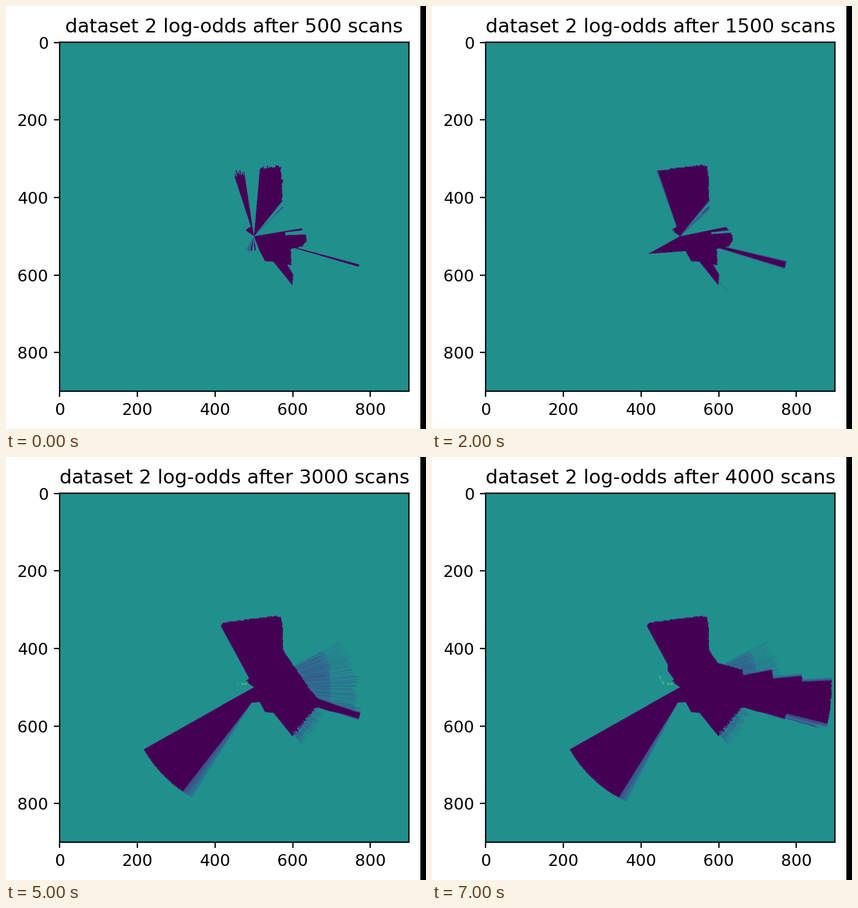
Write a matplotlib script that moves like this. It is 745x751 px and loops after 8000 ms.

```python
import numpy as np
import matplotlib.pyplot as plt
from matplotlib.animation import FuncAnimation
from matplotlib.patches import Rectangle

W, H, DPI = 745, 751, 64
PX = 72 / DPI                      # points per pixel
LEFT, RIGHT, TOP, BOTTOM = 95.1, 714.7, 64.3, 683.9
STAGES, CELLS, ROBOT = 8, 900, 500
UNKNOWN = 0.5
rng = np.random.default_rng(4)

# Polar view of the grid from the robot; angles in degrees, 0 right, 90 down
rows, cols = np.mgrid[:CELLS, :CELLS]
ANG = np.degrees(np.arctan2(rows - ROBOT, cols - ROBOT))
RAD = np.hypot(rows - ROBOT, cols - ROBOT)
maps = np.full((STAGES, CELLS, CELLS), UNKNOWN, dtype=np.float32)

# Corners of the room: angle, distance in cells
WALL = np.array([(-118, 183), (-115, 185), (-91, 178), (-73, 193), (-69, 196),
                 (-64, 171), (-52.6, 124), (-24, 119), (-9.5, 124), (-2, 135),
                 (5, 138), (12, 129), (19, 102), (38, 124), (40.5, 113),
                 (44, 142), (52, 163), (52.7, 84), (66, 71), (69, 41), (97, 39)])


def chord(a, a0, r0, a1, r1):
    """Distance to the straight line between two polar points."""
    def sin(d):
        return np.sin(np.radians(d))
    return sin(a1 - a0) / (sin(a1 - a) / r0 + sin(a - a0) / r1)


def wall(a):
    angles, reach = WALL.T
    a = np.clip(a, angles[0], angles[-1])
    k = np.clip(np.searchsorted(angles, a) - 1, 0, len(WALL) - 2)
    return chord(a, angles[k], reach[k], angles[k + 1], reach[k + 1])


def darken(stage, cells, value):
    maps[stage][cells] = np.minimum(maps[stage][cells], value)


def sweep(stage, a0, a1, r0=None, r1=None, shade=0.0, soft=0.0, ragged=0.02):
    """Clear a sector up to the wall, an arc (r0) or a line (r0 to r1)."""
    cells = (ANG >= a0 - soft) & (ANG <= a1 + soft)
    a = np.clip(ANG[cells], a0, a1)
    if r0 is None:
        reach = wall(a)
    elif r1 is None:
        reach = np.full_like(a, r0)
    else:
        reach = chord(a, a0, r0, a1, r1)
    noise = rng.random(int((a1 - a0) / 0.8) + 2)
    reach = reach * (1 - ragged * noise[((a - a0) / 0.8).astype(int)])
    fade = np.abs(ANG[cells] - a) / max(soft, 1e-6)
    value = shade + (UNKNOWN - shade) * np.sqrt(fade.clip(0, 1))
    darken(stage, cells, np.where(RAD[cells] <= reach, value, UNKNOWN))


def rays(stage, a0, a1, reach, inner=0, shades=(0.38, 0.5), step=0.45):
    """Faint single scans, darker up to the inner distance."""
    count = int((a1 - a0) / step) + 1
    shade = rng.uniform(*shades, count)
    far = reach * rng.uniform(0.92, 1, count)
    cells = (ANG >= a0) & (ANG < a1) & (RAD <= reach)
    k = ((ANG[cells] - a0) / step).astype(int)
    r = RAD[cells]
    value = shade[k] - 0.07 * (r < inner)
    darken(stage, cells, np.where(r <= far[k], value, UNKNOWN))


def left_beam(stage, edge, fringe, layers=5):
    """Long beam to the lower left whose lower edge fades out."""
    for k in range(layers + 1):
        a = edge - fringe * k / layers
        shade = 0.2 + 0.2 * k / layers if k else 0
        sweep(stage, 97, a, 39, 326, shade, ragged=0)
        sweep(stage, a, 150.6, 326, shade=shade, ragged=0.005)


def right_beam(stage, first, last, end=13.8):
    """Nested beams: the further they reach, the narrower they are."""
    sweep(stage, -24 + min(0, first + 8), first, 119, 167)
    for reach, part in zip(np.linspace(167, 392, 4), (1, 0.6, 0.2, 0)):
        start = last + (first - last) * part
        sweep(stage, start, end, reach, soft=1.6, ragged=0.008)


# 500 scans: two upper wings, the body and one long ray
sweep(0, -108, -98.5, ragged=0.1)
sweep(0, -145, -98.5, 26)
sweep(0, -85, -51, ragged=0.06)
sweep(0, -45.5, -44.6, 107)
sweep(0, -9.5, -7, ragged=0)
sweep(0, -7, -2, 82)
sweep(0, -2, 69)
sweep(0, 15, 16.3, 281, ragged=0)
sweep(0, 82, 88, 37)
sweep(0, 97, 103, 38)
rays(0, 103, 121, 43, shades=(0.25, 0.4), step=3)

# 1000 scans: the wings join
sweep(1, -99, -85)
sweep(1, 69, 121, 39, 44)
sweep(1, 14.3, 16.5, 281, ragged=0)

# 1500 scans: a thicker ray and a spike to the left
sweep(2, -108.5, -51, soft=2)
rays(2, -47, -41, 108, shades=(0.2, 0.5))
sweep(2, -11.5, -7)
sweep(2, -4, 12)
sweep(2, 13.6, 16.7, 282, soft=1, ragged=0)
sweep(2, 69, 151, 41, 94, ragged=0)
rays(2, 48, 50.5, 195, shades=(0.42, 0.5))

# 2000 scans: the whole upper sector, a rounder right side, the left beam
sweep(3, -118.2, -51, soft=0.8)
sweep(3, -50, -30, 38, 109)
sweep(3, -30, 97)
sweep(3, 20, 32, 108, 149)
sweep(3, 32, 52, 162, ragged=0.07)
rays(3, -48, -40, 108, shades=(0.25, 0.5))
rays(3, -12, 11, 272, 197, (0.35, 0.5))
rays(3, 10, 14, 282, shades=(0.25, 0.42))
rays(3, 27, 50, 197, 175, (0.38, 0.5))
left_beam(3, 147.4, 3.8)

# 2500 scans
sweep(4, -52, -24)
sweep(4, -24, 3, 119, 140)
rays(4, -20, -12, 265, 197, (0.42, 0.5))
left_beam(4, 136, 5)

# 3000 scans
sweep(5, -24, 3, 119, 147)
sweep(5, 3, 10, 147, 170)
sweep(5, 10, 13.8, 170, 282)
sweep(5, 17, 32, 174, 163, ragged=0.06)
sweep(5, 16, 17.6, 282, 206)
rays(5, -28, -12, 258, 203, (0.41, 0.5))
rays(5, -26, -5, 200, shades=(0.24, 0.45))
rays(5, 17, 30, 190, shades=(0.38, 0.5))
left_beam(5, 124.3, 5)

# 3500 and 4000 scans: the right beam reaches out, then widens
right_beam(6, -8, 7.2)
rays(6, 13.5, 16.5, 392, shades=(0.22, 0.45))
left_beam(6, 119, 4)
right_beam(7, -16, -2.5)
sweep(7, -127, -118, 54, 67)

maps = np.minimum.accumulate(maps, axis=0)


def hits(stage, start, stop, count, low, high):
    """Occupied cells scattered along a line."""
    t = rng.random((count, 1))
    spots = np.array(start) * (1 - t) + np.array(stop) * t + rng.uniform(-2, 2, (count, 2))
    for x, y in spots.astype(int):
        maps[stage:, y:y + 2, x:x + 2] = rng.uniform(low, high)


hits(2, (484, 484), (484, 492), 4, 0.55, 0.75)
hits(3, (341, 411), (359, 420), 4, 0.51, 0.57)
hits(5, (456, 491), (488, 491), 14, 0.6, 0.95)
hits(6, (447, 474), (458, 490), 8, 0.55, 0.85)
hits(7, (446, 468), (456, 480), 8, 0.55, 0.8)

plt.rcParams["font.family"] = "DejaVu Sans"
fig = plt.figure(figsize=(W / DPI, H / DPI), dpi=DPI, facecolor="white")
fig.add_artist(Rectangle((735 / W, 0), 10 / W, 1, color="black", lw=0))
ax = fig.add_axes([LEFT / W, 1 - BOTTOM / H, (RIGHT - LEFT) / W, (BOTTOM - TOP) / H])
image = ax.imshow(maps[0], cmap="viridis", vmin=0, vmax=1, aspect="auto")
ax.set_xticks(range(0, CELLS, 200))
ax.set_yticks(range(0, CELLS, 200))
ax.tick_params(length=10 * PX, width=2.29 * PX, pad=10 * PX, labelsize=28.67 * PX)
for spine in ax.spines.values():
    spine.set_linewidth(2.29 * PX)
    spine.set_snap(False)
title = ax.set_title("", fontsize=34.4 * PX, pad=17.2 * PX)


def draw(i):
    title.set_text(f"dataset 2 log-odds after {500 * (i + 1)} scans")
    image.set_data(maps[i])
    return image, title


anim = FuncAnimation(fig, draw, frames=STAGES, interval=1000, repeat=True)
plt.show()
```
